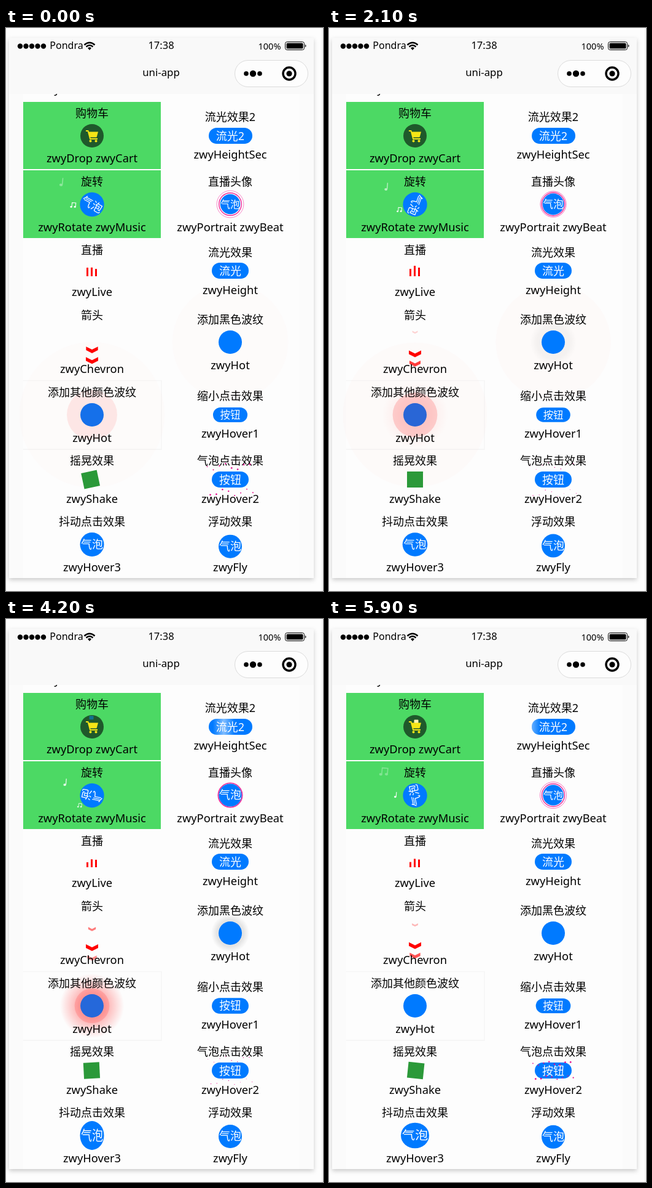
An HTML page that plays this animation: 516 px wide and 914 px high, repeating every 6 s.

```html
<!DOCTYPE html>
<html lang="zh-CN">
<head>
<meta charset="utf-8">
<title>uni-app</title>
<style>
html, body { margin: 0; width: 100%; height: 100%; overflow: hidden; background: #fdfdfd; }
svg { display: block; width: 516px; height: 914px; }
text { font: 18px "Noto Sans", "Noto Sans CJK SC", "Noto Sans CJK", sans-serif; text-anchor: middle; fill: #000; }
.name { font-size: 18.3px; }
.on { fill: #fff; }
.blue { fill: #007aff; }
.line { fill: none; stroke: #f5f5f5; stroke-width: 1.5; }
.pink { fill: none; stroke: #f02a9a; }
</style>
</head>
<body>
<svg viewBox="0 0 516 914">
  <defs>
    <filter id="shadow" x="-5%" y="-5%" width="110%" height="110%">
      <feDropShadow dx="0" dy="3" stdDeviation="3.5" flood-opacity=".2"/>
    </filter>
    <radialGradient id="redGlow">
      <stop offset=".42" stop-color="#f00"/>
      <stop offset="1" stop-color="#f00" stop-opacity="0"/>
    </radialGradient>
    <radialGradient id="greyGlow">
      <stop offset=".7" stop-color="#000"/>
      <stop offset="1" stop-color="#000" stop-opacity="0"/>
    </radialGradient>
    <linearGradient id="shine">
      <stop offset="0" stop-color="#fff" stop-opacity="0"/>
      <stop offset=".5" stop-color="#fff" stop-opacity=".5"/>
      <stop offset="1" stop-color="#fff" stop-opacity="0"/>
    </linearGradient>
    <clipPath id="pill"><rect x="330" y="162" width="71" height="26" rx="13"/></clipPath>
    <clipPath id="page"><rect x="5" y="107" width="496" height="786"/></clipPath>
    <path id="chevron" d="M-10-5 0 0 10-5V1L0 6-10 1Z"/>
  </defs>

  <rect x="5" y="16" width="496" height="877" fill="#fbfbfb" filter="url(#shadow)"/>
  <path d="M514.5 0V914" stroke="#f0f0f0"/>
  <rect x="5" y="16" width="496" height="91" fill="#f9f9f9"/>
  <rect x="28" y="107" width="450" height="786" fill="#fdfdfd"/>

  <g id="dots"></g>
  <text x="98.500" y="34" style="font-size:16px" fill="#333">Pondra</text>
  <g fill="none" stroke="#000" stroke-width="2.4">
    <path d="M127.500 27.500Q136 20 144.500 27.500M130.500 30.500Q136 25.500 141.500 30.500"/>
    <path d="M133 32.500 136 36 139 32.500Q136 30 133 32.500Z" fill="#000" stroke="none"/>
  </g>
  <text x="252.500" y="34" style="font-size:16.500px">17:38</text>
  <text x="429" y="35" style="font-size:14.500px">100%</text>
  <rect x="454.500" y="22.500" width="31" height="13" rx="3" fill="none" stroke="#000"/>
  <rect x="456.500" y="24.500" width="27" height="9" rx="1.500"/>
  <path d="M487 26.500Q490 29 487 31.500Z"/>
  <text x="252.500" y="78" style="font-size:16.800px">uni-app</text>
  <rect x="372.500" y="52.500" width="119" height="43" rx="21.500" fill="#fdfdfd" stroke="#dcdcdc"/>
  <circle cx="391" cy="74" r="3.800"/><circle cx="402" cy="74" r="5.200"/><circle cx="413" cy="74" r="3.800"/>
  <circle cx="461" cy="74" r="10" fill="none" stroke="#000" stroke-width="3.400"/><circle cx="461" cy="74" r="4.600"/>

  <g clip-path="url(#page)">
    <text class="name" x="83" y="106">y</text>
    <path fill="#4cd964" d="M28 120H252V229H28ZM28 231H252V341H28Z"/>
    <path class="line" d="M28 572.500H253V684H28M253 572V684"/>

    <circle cx="140" cy="175" r="19" fill="#1f592b"/>
    <g id="goods"></g>
    <path d="M130 167H133.500L137 180H149" fill="none" stroke="#f5e616" stroke-width="1.800"/>
    <path d="M134 168.500H150L147.500 177.500H136.500Z" fill="#f5e616"/>
    <circle cx="137.500" cy="183.500" r="2" fill="#f5e616"/><circle cx="146.500" cy="183.500" r="2" fill="#f5e616"/>

    <g id="spin"><circle class="blue" r="19.700"/><text class="on" y="6.500">气泡</text></g>
    <g id="quaver" fill="#fff">
      <path d="M-4 4V-6H5V3" fill="none" stroke="#fff" stroke-width="1.600"/>
      <ellipse cx="-5.500" cy="4.500" rx="2.600" ry="2"/><ellipse cx="3.500" cy="3.500" rx="2.600" ry="2"/>
    </g>
    <g id="note" fill="#fff">
      <path d="M2 4V-7" stroke="#fff" stroke-width="1.500"/><ellipse cy="4.500" rx="2.600" ry="2.100"/>
    </g>

    <g id="bars" fill="#f00"></g>
    <g id="chevrons" fill="#f00"></g>

    <circle id="redWave" cx="140" cy="628" fill="#ff5a3c" stroke="#f00"/>
    <circle id="redHalo" cx="140" cy="628" fill="url(#redGlow)"/>
    <circle class="blue" cx="140" cy="628" r="19"/>
    <circle id="redDisc" cx="140" cy="628" fill="#f00"/>

    <circle id="greyWave" cx="365" cy="510" fill="#ff5a3c" stroke="#f00"/>
    <circle id="greyHalo" cx="365" cy="510" fill="url(#greyGlow)"/>
    <circle class="blue" cx="365" cy="510" r="19"/>

    <rect id="shake" x="-13" y="-13" width="26" height="26" fill="#2b9939"/>
    <g id="jelly"><circle class="blue" r="19.500"/><text class="on" y="6.500">气泡</text></g>

    <rect class="blue" x="330" y="162" width="71" height="26" rx="13"/>
    <g clip-path="url(#pill)"><rect id="sweep" y="162" width="36" height="26" fill="url(#shine)"/></g>
    <text class="on" x="365" y="181.500">流光2</text>

    <circle id="ringOut" class="pink" cx="365" cy="286"/>
    <circle id="ringIn" class="pink" cx="365" cy="286" stroke-width="1.400"/>
    <g id="beat"><circle class="blue" r="18.700"/><text class="on" y="6.500">气泡</text></g>

    <rect class="blue" x="335" y="381" width="60" height="26" rx="13"/>
    <text class="on" x="365" y="400.500">流光</text>
    <g id="press"><rect class="blue" x="-30.500" y="-13" width="61" height="26" rx="13"/><text class="on" y="6.500">按钮</text></g>
    <rect class="blue" x="335" y="720" width="60" height="26" rx="13"/>
    <text class="on" x="365" y="739.500">按钮</text>
    <g id="fly"><circle class="blue" r="19"/><text class="on" y="6.500">气泡</text></g>
    <g id="labels"></g>
    <g id="bubbles" fill="#e5108c"></g>
  </g>
</svg>
<script>
const $ = id => document.getElementById(id);
const set = (el, attrs) => { for (const k in attrs) el.setAttribute(k, attrs[k]); return el; };
const add = (parent, tag, attrs) =>
  parent.appendChild(set(document.createElementNS('http://www.w3.org/2000/svg', tag), attrs));
const phase = (t, period, shift = 0) => (((t / period + shift) % 1) + 1) % 1;
const wave = p => Math.cos(2 * Math.PI * p);

// Piecewise linear curve through x, y pairs
function curve(x, ...pts) {
  let i = 0;
  while (i < pts.length - 4 && x > pts[i + 2]) i += 2;
  const k = Math.min(1, Math.max(0, (x - pts[i]) / (pts[i + 2] - pts[i])));
  return pts[i + 1] + (pts[i + 3] - pts[i + 1]) * k;
}
function place(el, x, y, sx = 1, sy = sx, turn = 0, opacity = 1) {
  set(el, { transform: `translate(${x} ${y}) rotate(${turn}) scale(${sx} ${sy})`, opacity });
}

const cells = [
  [140, 138, '购物车', 211, 'zwyDrop zwyCart'], [365, 144, '流光效果2', 205, 'zwyHeightSec'],
  [140, 249, '旋转', 323, 'zwyRotate zwyMusic'], [365, 249, '直播头像', 323, 'zwyPortrait zwyBeat'],
  [140, 360, '直播', 428, 'zwyLive'], [365, 364, '流光效果', 425, 'zwyHeight'],
  [140, 466, '箭头', 553, 'zwyChevron'], [365, 473, '添加黑色波纹', 547, 'zwyHot'],
  [140, 591, '添加其他颜色波纹', 665, 'zwyHot'], [365, 597, '缩小点击效果', 658, 'zwyHover1'],
  [140, 702, '摇晃效果', 764, 'zwyShake'], [365, 702, '气泡点击效果', 764, 'zwyHover2'],
  [140, 801, '抖动点击效果', 875, 'zwyHover3'], [365, 801, '浮动效果', 875, 'zwyFly']
];
for (const [x, y, title, nameY, name] of cells) {
  add($('labels'), 'text', { x, y: y + 6.5 }).textContent = title;
  add($('labels'), 'text', { x, y: nameY + 6.5, class: 'name' }).textContent = name;
}
for (let i = 0; i < 5; i++) add($('dots'), 'circle', { cx: 23 + i * 9.5, cy: 29.5, r: 4.2 });

// Start, duration and look of each thing dropped into the cart
const goods = [[.58, .3, '#fff', 140], [.8, .85, '#0a84d8', 139], [2.45, .22, '#fff3b0', 142]]
  .map(([start, time, fill, x]) =>
    ({ start, time, x, el: add($('goods'), 'rect', { x: -3.5, y: -3, width: 7, height: 6, rx: 1, fill }) }));
const bars = [0, 1, 2].map(i => add($('bars'), 'rect', { x: 131 + i * 7, width: 3 }));
const chevrons = [0, 1, 2].map(() => add($('chevrons'), 'use', { href: '#chevron' }));
const bubbles = [...Array(16).keys()].map(() => add($('bubbles'), 'circle', {}));

function music(el, p) {
  const size = .5 + .65 * p;
  place(el, curve(p, 0, 124, .27, 110, .42, 100, .57, 96, .77, 90, 1, 92), 308 - 75 * p,
    size, size, 5, curve(p, 0, .5, .1, 1, .5, 1, .8, .3, .86, 0));
}

function ripples(t) {
  const q = phase(t - .6, 2.8);
  const spread = curve(q, .3, 0, .54, 1);
  const faint = curve(q, .3, 0, .5, .014, .75, .01, .85, 0);
  set($('redDisc'), { r: curve(q, .08, 19, .3, 29, .54, 36.5, .75, 41),
    opacity: curve(q, .08, 0, .29, .15, .54, .16, .75, .085, .79, .08, .87, 0) });
  set($('redHalo'), { r: curve(q, .08, 28, .3, 54), opacity: curve(q, .08, 0, .29, .32, .54, .06, .7, 0) });
  set($('redWave'), { r: 60 + 58 * spread, opacity: faint });
  set($('greyHalo'), { r: curve(q, .08, 20, .3, 32, .54, 38), opacity: curve(q, .08, 0, .29, .1, .54, .035, .7, 0) });
  set($('greyWave'), { r: 50 + 44 * spread, opacity: faint });
}

function burst(u) {
  const p = phase(u - .25, .933);
  const reach = curve(p, 0, .45, .2, .9, .5, 1, 1, 1.1);
  const size = curve(p, 0, 1.6, .2, .7, .36, .6, .48, 1.5, .75, 1.3, 1, .6);
  bubbles.forEach((el, i) => {
    const side = i % 2 ? 1 : -1;
    set(el, {
      cx: 365 + (-37 + i * 4.9) * (.75 + .25 * reach),
      cy: 733 + side * (20 + 5 * Math.sin(i * 2.3)) * reach,
      r: size * (.65 + .4 * Math.abs(Math.sin(i * 1.7))),
      opacity: p > .3 && p < .42 && i % 5 !== 1 ? 0 : 1
    });
  });
}

function draw(t) {
  const u = t % .933;

  for (const { start, time, x, el } of goods) {
    const p = (t % 3.3 - start) / time;
    place(el, x, 159 + 11 * p, 1, 1, 0, p < 0 || p > 1 ? 0 : Math.min(1, p * 5));
  }
  place($('spin'), 140, 286.5, 1, 1, 29 + t * 38.6);
  music($('quaver'), phase(t, 2.333, .27));
  music($('note'), phase(t, 2.333, .77));

  const live = phase(t, .56);
  bars.forEach((el, i) => {
    const height = [11, 13.5, 12][i] + [3, 3.5, 2][i] * wave(live - [.95, .78, .74][i]);
    set(el, { y: 403 - height, height });
  });

  const step = phase(t, .933, .95);
  place(chevrons[0], 140, 486 + 38 * step, .3 + .7 * step, .3 + .7 * step, 0, Math.min(1, Math.max(0, step * 1.35 - .1)));
  place(chevrons[1], 140, curve(step, 0, 525, .45, 533, 1, 540));
  place(chevrons[2], 140, curve(step, 0, 540, .45, 550, 1, 555), 1 - .5 * step, 1 - .5 * step, 0,
    Math.max(0, 1 - step * 1.2));

  ripples(t);

  set($('sweep'), { x: 257 + u * 170 });
  const e = phase(t - .4, .747);
  const pulse = wave(e - .03);
  place($('beat'), 365, 286, .93 + .07 * pulse);
  set($('ringIn'), { r: 18.8 + .6 * pulse });
  set($('ringOut'), { r: 19.6 + 5 * e, opacity: 1 - e });

  place($('press'), 365, 628, .95 + .05 * wave((u - .6) / .933));
  const turn = curve(u, 0, -12, .233, 0, .3, 6, .467, -3, .567, 0, .7, 8, .833, 3, .933, -12);
  place($('shake'), 140 + turn * .2, 733, 1, 1, turn);
  burst(u);
  place($('jelly'), 140, 838.5,
    curve(u, 0, 1, .233, 1.04, .3, 1.18, .467, 1, .567, 1.1, .7, 1.2, .833, 1.05, .933, 1),
    curve(u, 0, 1, .233, .98, .3, 1.06, .467, 1.2, .567, 1.12, .7, 1.03, .833, 1, .933, 1));
  place($('fly'), 365, 840.7 - 2.2 * wave((t - 1.2) / 3.733));
}

function tick() {
  draw(Math.floor(performance.now() % 6000 / 100) / 10);
  requestAnimationFrame(tick);
}
tick();
</script>
</body>
</html>
```
